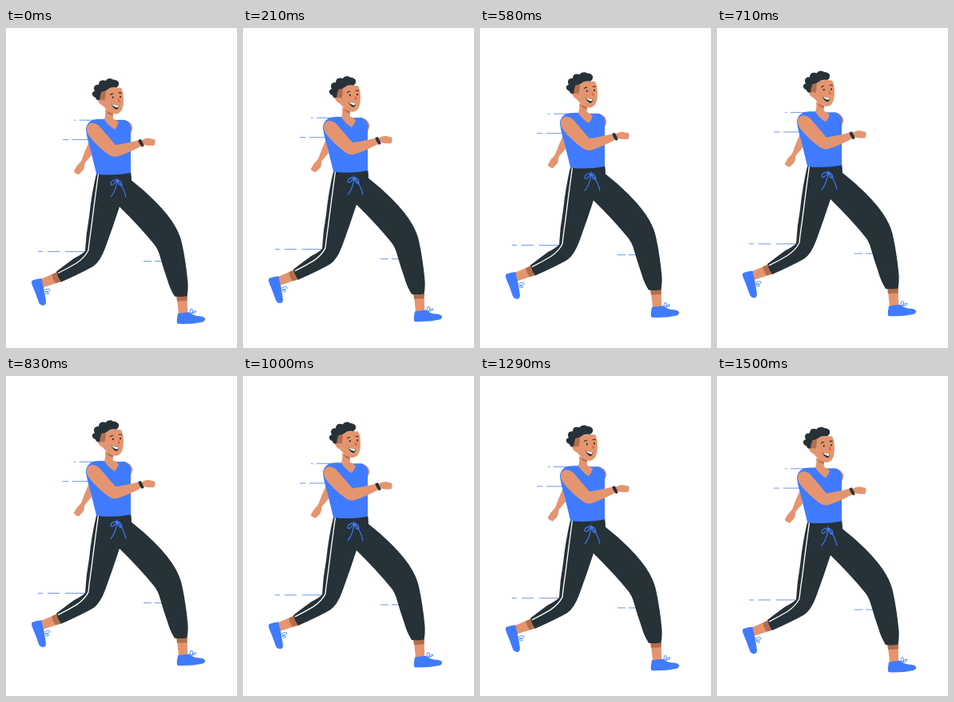
Write an HTML page with a canvas that moves like this. It is 289 px wide and 400 px high and loops after 1.54 s.

```html
<!DOCTYPE html>
<html lang="en">
<head>
<meta charset="utf-8">
<title>Runner</title>
<style>
  html, body { margin: 0; width: 100%; height: 100%; overflow: hidden; background: #fff; }
  canvas { display: block; width: 289px; height: 400px; }
</style>
</head>
<body>
<canvas id="stage" width="289" height="400"></canvas>
<script>
const ctx = document.getElementById('stage').getContext('2d');

const BLUE = '#407bff', DARK = '#263238', SKIN = '#e4956f', SHADE = '#b16e4e', LINE = '#4c7ce2';
const LOOP = 1540, STEPS = 37, PEAK = 705, SPEED = 0.0136, LIFT = 9.6;

const shapes = [];
const fill = (color, d) => shapes.push({ color, path: new Path2D(d) });
const stroke = (color, width, d) => shapes.push({ color, width, path: new Path2D(d) });

// Speed lines
stroke(LINE, 0.8, 'M85 115.2H87.5M92 115.2H112M71 139.6H78M83 139.6H106M40 279.4H46M52 279.4H67M74 279.4H102M172 291.5H182M186 291.5H197');

// Back arm and far shoulder
fill(SKIN, 'M104 142L107 159Q102 165 98.5 169Q98 174 97 177L91 183.2Q86 182 84.8 179Q88 172 94 166.5Q98 155 104 142Z');
fill(SKIN, 'M149 115Q157 117 158.5 125Q158 129 155 132Z');

// Ankles
fill(SKIN, 'M42 314.5L63 305.5L69 317L46 324.5Z');
fill(SHADE, 'M57.5 308L64 305L69.5 317L62 319Q58 314 57.5 308Z');
fill(SKIN, 'M213.5 334H226.5L227.2 357H216Z');
fill(SHADE, 'M213 334H227L226.5 341L214 341.5Z');

// Shoes and laces
fill(BLUE, 'M33 315.5Q39 313 44.5 313Q45.5 319 47 324Q49 334 50 342Q50 346 47 346.7Q43 347 41 343Q37 331 33 322Q31 317 33 315.5Z');
stroke(BLUE, 0.9, 'M48 328Q53 325 55 327Q55 330 49 329.5Q53 330 53.5 332Q52 334 49 331');
fill(BLUE, 'M215 357Q222 356 229 355.3Q233 359 239 360Q247 360 249 363Q249.5 366 246 367.4Q232 370.5 215 369.8Q213.3 369 214 363Z');
stroke(BLUE, 0.9, 'M231 357Q229 352 232 351Q235 352 232 357Q235 352.5 238 354Q238 356.5 232 357');

// Trousers
fill(DARK, 'M113.3 181L156 179.5Q157 184 157 190.5Q172 202 185.5 215.5Q204 234 212 248.5Q218.5 260 220.5 271Q225 292 227.5 318Q228 328 226.5 335Q219 336.5 211 335.5Q205 326 202 315Q197 301 192.5 285Q190 276 185 270Q168 249 142 223.5Q134 248 124.5 274Q118 292 109 298Q95 306 69 317.5Q65 312 63 304.5Q74 296 85 288Q94 283.5 99 279Q100 258 104 236Q107 207 113.3 181Z');
stroke('#fff', 1.3, 'M115.5 182Q111 215 106.5 251Q104 268 103 278Q98.5 287 88 294Q78 300 65 306.5');

// Drawstring
stroke(BLUE, 1.1, 'M139 189.5Q131 190 131 195Q133 199 139 189.5Q145 191 145 196.5Q141 199 139 189.5Q138 203 131 211.5M139 189.5Q148 200 150 211.5');

// Top and neck
fill(BLUE, 'M108 115Q115 113.5 123 114L135 115L148 114.8Q154 116.5 156.6 123Q156 132 156 141L156.2 181Q136 185 113.2 182.7Q108 161 104 146Q100 132 100 125Q102 118 108 115Z');
fill(SKIN, 'M124 102L134 104L133.8 113Q138 115 141 118Q139.5 123 136 127Q128 122 122.8 114Q125 110 124 102Z');
fill(SHADE, 'M125.5 104L134 107V109Q129 109 125.5 104Z');

// Front arm, hand and watch
fill(SKIN, 'M108 118.8Q114 119 118 124L137 146.2Q151 144 167.5 140L170.5 147Q154 156 139 160.8Q133 162 128 158Q113 147 104 135Q100 129 101.3 123.5Q104 119 108 118.8Z');
fill(SKIN, 'M169.5 140.5Q173 138 178 137.6L186 139.5Q187.5 142 185.3 147L178 147L172 146Z');
fill(DARK, 'M165.3 140.2L168.6 138.8Q171.5 143 172.7 147.6L170 148.8Q166.5 145 165.3 140.2Z');

// Head
fill(SKIN, 'M119 80Q129 73 144 75Q147 80 147 90Q147 103 141 106.5Q136 109 130 105.5Q124 101 121 97Q116 95 115 90Q116 88 119 88Z');
fill(SHADE, 'M118 80L124.5 76.5Q125.5 85 123 91Q121 88 117 91Z');
fill(DARK, 'M115 90.5Q112 89 112 87Q107 85 108 81Q109 79 111 79Q108.5 74 112 71.5Q114 70.5 116 71Q116 66 120 65.5Q123 65 124.5 66Q127 62.6 131 63.2Q133 63.6 134 64.5Q139 64.5 141 68Q142 72 138 74.5Q132 74 129 75.5Q124 79.5 119.5 79.5Q117.5 84 117.5 89Z');

// Face
stroke(DARK, 1.1, 'M130.3 84Q131.5 81.7 134.2 82.2M140.7 81.5Q143 80.2 144.7 81.6');
fill(DARK, 'M132.8 86.8a1 1.3 0 1 0 2 0a1 1.3 0 1 0 -2 0ZM142 86a1 1.3 0 1 0 2 0a1 1.3 0 1 0 -2 0Z');
fill('#dc6a48', 'M139.5 87Q143.5 90 142.8 92Q141.5 93.2 139.6 92Q141 90 139.5 87Z');
fill(DARK, 'M131.5 94.5Q136 97 141 96.7Q140.8 101.8 138 101.8Q133.5 100 131.5 94.5Z');
fill('#fff', 'M132 95Q136 97 140.6 96.8Q140.4 98.5 139.7 99.4Q134.8 98.8 132 95Z');

// Steady rise and fall, turning sharply at each end
function bob(ms) {
  const step = Math.floor((ms % LOOP + 5) * STEPS / LOOP) % STEPS;
  const gap = Math.abs(step * LOOP / STEPS - PEAK);
  return SPEED * Math.min(gap, LOOP - gap) - LIFT;
}

function draw(ms) {
  ctx.setTransform(1, 0, 0, 1, 0, 0);
  ctx.fillStyle = '#fff';
  ctx.fillRect(0, 0, 289, 400);
  ctx.translate(0, bob(ms));
  for (const { color, width, path } of shapes) {
    if (width) {
      ctx.strokeStyle = color;
      ctx.lineWidth = width;
      ctx.stroke(path);
    } else {
      ctx.fillStyle = color;
      ctx.fill(path);
    }
  }
}

const start = performance.now();
function tick() {
  draw(performance.now() - start);
  requestAnimationFrame(tick);
}
tick();
</script>
</body>
</html>
```
